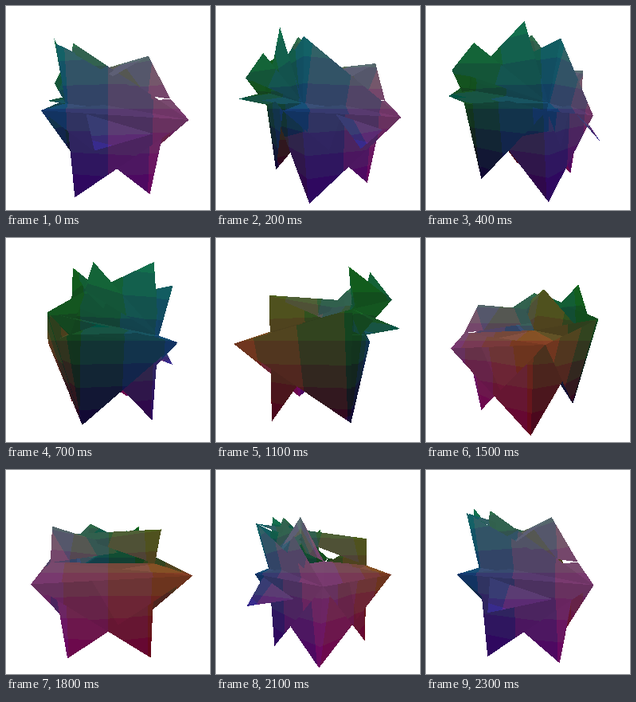
An HTML page with a canvas that plays this animation: 256 by 256 pixels, repeating every 2.4 s.

```html
<!DOCTYPE html>
<html>
<head>
<meta charset="utf-8">
<style>
html, body { margin: 0; width: 100%; height: 100%; overflow: hidden; background: #fff; }
canvas { display: block; width: 256px; height: 256px; }
</style>
</head>
<body>
<canvas id="stage" width="256" height="256"></canvas>
<script>
const SIZE = 256, MID = 128, DIST = 215, STEP = 100, STEPS = 24;
const ctx = document.getElementById('stage').getContext('2d');
const img = ctx.createImageData(SIZE, SIZE);
const pixels = new Uint32Array(img.data.buffer);
const depth = new Float32Array(SIZE * SIZE);

// Spike tips: angle around the vertical axis in degrees, radius, height.
const tips = {
  a: [-39, 54, -90], b: [45.5, 59, -87], c: [137, 59, -87], d: [-131, 57, -81],
  e: [-43, 62, 5], f: [48, 79, 9], g: [140, 62, 9], h: [-133, 72, 5],
  X: [-50, 83, -2], L: [47, 96, -10], O: [142, 97, -3], Y: [-146, 83, 25],
  W: [-110, 94, 11], V: [-116, 89, 37], N: [-7, 86, -32], Z: [-17, 67, -5],
  R: [30, 77, -22], G: [32, 69, 48], T: [-39, 76, 59], P: [-56, 47, 72],
  Q: [-63, 66, 76], U: [-116, 68, 68], B: [-138, 62, 69], K: [147, 66, 45]
};
const faces = (
  'aeL aeY bfX bfO cgL cgY dhO dhX ' +
  'XLe XLf LOf LOg fgL Ogh OYd YXh Yhe ' +
  'TLe TYe PLe PYe QYe UVe UhV BhV Bhe ' +
  'YhV WYe Whe GVf GeV KTg Khg ZNR'
).split(' ');

const rad = deg => deg * Math.PI / 180;
const body = {};
for (const key in tips) {
  const [angle, r, y] = tips[key];
  body[key] = [r * Math.sin(rad(angle)), y, r * Math.cos(rad(angle))];
}

// Faces that look up or down are lighter.
function faceLight([p, q, r]) {
  const u = q.map((v, i) => v - p[i]), w = r.map((v, i) => v - p[i]);
  const nx = u[1] * w[2] - u[2] * w[1];
  const ny = u[2] * w[0] - u[0] * w[2];
  const nz = u[0] * w[1] - u[1] * w[0];
  return 0.9 + 0.32 * Math.abs(ny) / (Math.hypot(nx, ny, nz) || 1);
}
const lights = faces.map(face => faceLight([...face].map(k => body[k])));

const band = (v, size) => (Math.floor(v / size) + 0.5) * size;
const channel = (base, gain, v, light) =>
  Math.max(0, Math.min(255, (base + gain * v) * light)) | 0;

function fillFace(points, light, sin, cos) {
  const [p, q, r] = points;
  const area = (q.x - p.x) * (r.y - p.y) - (q.y - p.y) * (r.x - p.x);
  if (Math.abs(area) < 0.01) return;
  const low = k => Math.max(0, Math.floor(Math.min(p[k], q[k], r[k])));
  const high = k => Math.min(SIZE - 1, Math.ceil(Math.max(p[k], q[k], r[k])));
  for (let y = low('y'), y1 = high('y'); y <= y1; y++) {
    for (let x = low('x'), x1 = high('x'); x <= x1; x++) {
      const s = ((x - p.x) * (r.y - p.y) - (y - p.y) * (r.x - p.x)) / area;
      const t = ((q.x - p.x) * (y - p.y) - (q.y - p.y) * (x - p.x)) / area;
      if (s < 0 || t < 0 || s + t > 1) continue;
      const m = p.m + s * (q.m - p.m) + t * (r.m - p.m);
      const at = y * SIZE + x;
      if (m <= depth[at]) continue;
      depth[at] = m;
      // Back to body space: position gives the colour.
      const vx = (x - MID) / m, vy = (MID - y) / m, vz = DIST - DIST / m;
      const red = channel(67, 0.78, band(vx * cos - vz * sin, 40), light);
      const green = channel(62, 0.68, band(vy, 22), light);
      const blue = channel(68, 0.6, band(vx * sin + vz * cos, 40), light);
      pixels[at] = (255 << 24 | blue << 16 | green << 8 | red) >>> 0;
    }
  }
}

function draw(step) {
  const turn = step * 2 * Math.PI / STEPS;
  const sin = Math.sin(turn), cos = Math.cos(turn);
  const view = {};
  for (const key in body) {
    const [x, y, z] = body[key];
    const m = DIST / (DIST - (z * cos - x * sin));
    view[key] = { x: MID + (x * cos + z * sin) * m, y: MID - y * m, m };
  }
  pixels.fill(0xffffffff);
  depth.fill(0);
  faces.forEach((face, i) => fillFace([...face].map(k => view[k]), lights[i], sin, cos));
  ctx.putImageData(img, 0, 0);
}

let shown = -1;
const start = performance.now();
function tick() {
  const step = Math.floor((performance.now() - start) / STEP) % STEPS;
  if (step !== shown) draw(shown = step);
  requestAnimationFrame(tick);
}
tick();
</script>
</body>
</html>
```
